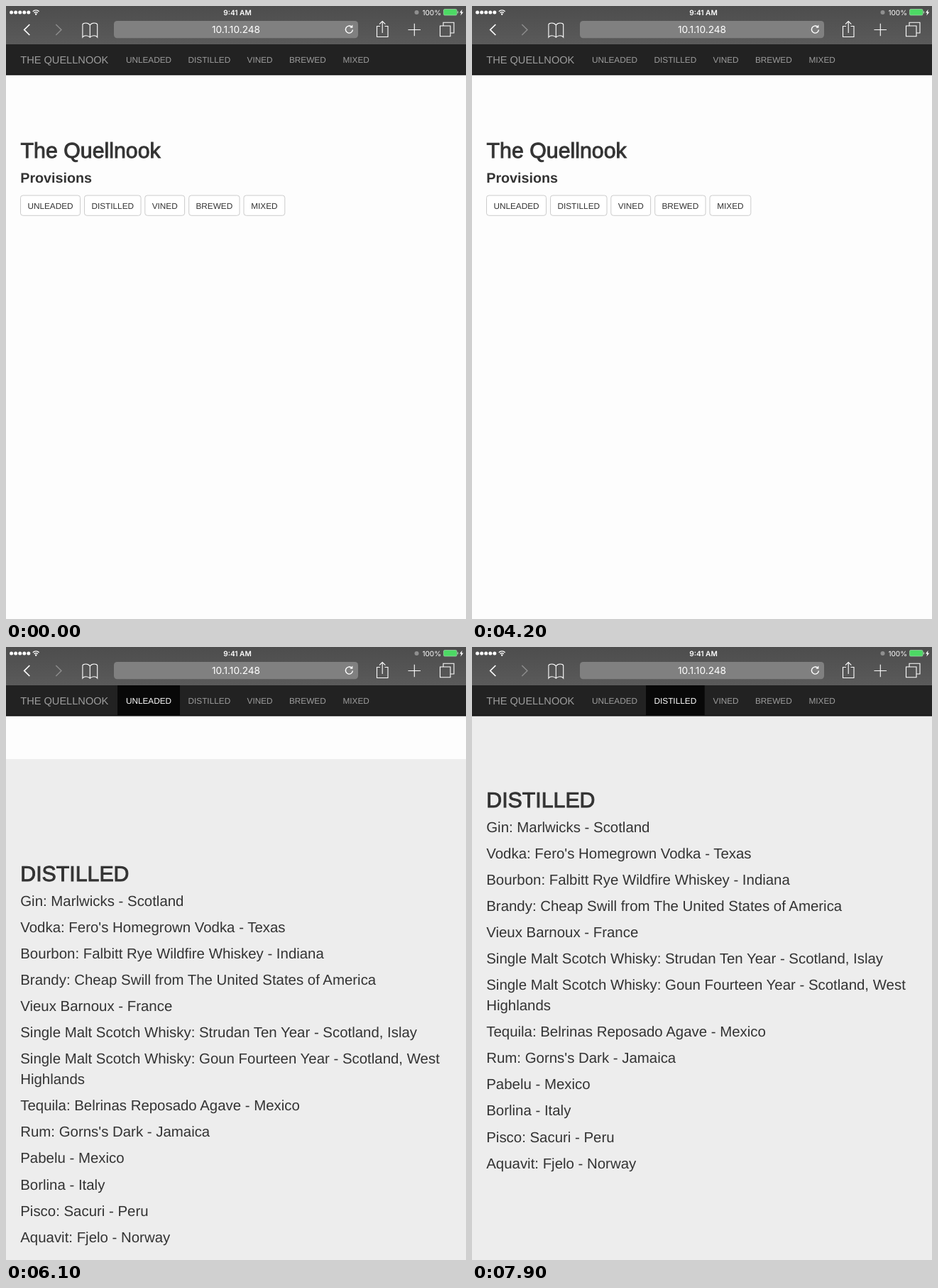
Write an HTML page that moves like this. It is 648 by 864 pixels and loops after 8000 ms.

```html
<!DOCTYPE html>
<html lang="en">
<head>
<meta charset="utf-8">
<title>Provisions</title>
<style>
  html, body { margin: 0; width: 100%; height: 100%; overflow: hidden; background: #fdfdfd; }
  svg { display: block; width: 648px; height: 864px; font-family: "Liberation Sans", Arial, sans-serif; text-rendering: geometricPrecision; }
  .page { fill: #333; }
  .title { font-size: 30.3px; stroke: #333; stroke-width: .95px; }
  .subtitle { font-size: 19.7px; font-weight: 700; }
  .item { font-size: 20.42px; }
  .small { font-size: 11.81px; text-anchor: middle; }
  .btn { fill: #fff; stroke: #ccc; }
  .nav { fill: #9d9d9d; }
  .brand { font-size: 14.6px; }
  .active { fill: #fff; }
  .ui { font-family: Inter, Roboto, sans-serif; fill: #fff; }
  .icon { fill: none; stroke: #fff; stroke-width: 1.1; }
</style>
</head>
<body>
<svg viewBox="0 0 648 864">
  <defs>
    <linearGradient id="bar" x2="0" y2="1">
      <stop stop-color="#4d4d4d"/>
      <stop offset="1" stop-color="#5a5a5a"/>
    </linearGradient>
  </defs>
  <rect width="648" height="864" fill="#fdfdfd"/>
  <g class="page" id="page">
    <text class="title" x="20.6" y="160">The Quellnook</text>
    <text class="subtitle" x="20.25" y="195">Provisions</text>
  </g>

  <g class="nav" id="nav">
    <rect y="54" width="648" height="43.3" fill="#222"/>
    <rect id="highlight" y="54" height="42.3" fill="#080808"/>
    <rect y="96.3" width="648" height="1" fill="#080808"/>
    <text class="brand" x="20.25" y="81.3">THE QUELLNOOK</text>
  </g>

  <rect width="648" height="54" fill="url(#bar)"/>
  <g class="ui" id="status">
    <text x="326" y="12.6" font-size="10.1" font-weight="600" text-anchor="middle">9:41 AM</text>
    <text x="613" y="12.6" font-size="10" text-anchor="end">100%</text>
    <g class="icon">
      <path d="M37.8 7.7a6.2 6.2 0 0 1 8.8 0M39.6 9.7a3.7 3.7 0 0 1 5.2 0" stroke-width="1.4"/>
      <circle cx="42.2" cy="11.6" r=".7" fill="#fff"/>
    </g>
    <circle cx="578.5" cy="9" r="3" fill="#8f8f8f"/>
    <rect x="616.5" y="4.5" width="18.5" height="8.5" rx="1.5" fill="#4cd964" stroke="#a5d9ae" stroke-width=".7"/>
    <rect x="635.8" y="7.2" width="1.3" height="3.2" rx=".6" fill="#a5d9ae"/>
    <path d="M642.6 4.8l-3.6 4.8h2.2l-.8 3.8 3.8-5h-2.3z"/>
  </g>
  <rect x="152" y="21" width="344" height="24.2" rx="4.5" fill="#808080"/>
  <text class="ui" x="324" y="38.2" font-size="13.7" text-anchor="middle">10.1.10.248</text>
  <g class="icon">
    <path d="M33.3 26l-7.6 7.5 7.6 7.5" stroke-width="1.7"/>
    <path d="M70.3 26l7.6 7.5-7.6 7.5" stroke="#8c8c8c" stroke-width="1.5"/>
    <path d="M118.3 27q-2-3-5.8-3t-4.6 2v18q1.5-2.2 4.8-2.2t5.6 2.4q2.3-2.4 5.6-2.4t4.8 2.2v-18q-.8-2-4.6-2t-5.8 3v17"/>
    <path d="M486.7 29.3a5 5 0 1 0 1.7 4.2" stroke-width="1.4"/>
    <path d="M484.3 30.8h4v-4.3z" fill="#fff" stroke="none"/>
    <path d="M527 28.5h-4.5v15h15.500v-15h-4.500M530.2 38v-16.5M526 25.7l4.2-4.2 4.2 4.2"/>
    <path d="M566.5 33.5h17.5M575.3 24.7v17.6"/>
    <path d="M611.5 28h14.5v14.8h-14.5zM616 28v-4.8h15v14.8h-5"/>
  </g>
</svg>
<script>
const LOOP = 8000, STEP = 100, SECTION = 810, TOP = 54;
const SCROLL = { start: 5128, length: 1500, distance: 2 * SECTION };
const $ = id => document.getElementById(id);

function add(parent, tag, attrs, text) {
  const node = document.createElementNS(parent.namespaceURI, tag);
  for (const name in attrs) node.setAttribute(name, attrs[name]);
  if (text) node.textContent = text;
  return parent.appendChild(node);
}

// label, button left, button width, tab left, tab width
const tabs = [
  ["UNLEADED", 20.5, 84, 157, 88],
  ["DISTILLED", 110.5, 79.5, 245, 82.7],
  ["VINED", 195.8, 55.8, 327.7, 59.8],
  ["BREWED", 257.7, 71.3, 387.5, 74.7],
  ["MIXED", 335, 57.8, 462.2, 62]
];
const links = tabs.map(([label, bx, bw, tx, tw]) => {
  add($("page"), "rect", { class: "btn", x: bx, y: 213, width: bw, height: 28.3, rx: 3.4 });
  add($("page"), "text", { class: "small", x: bx + bw / 2, y: 231.5 }, label);
  return add($("nav"), "text", { class: "small", x: tx + tw / 2, y: 79.7 }, label);
});

function addSection(index, title, fill, lines) {
  const group = add($("page"), "g", { transform: `translate(0 ${index * SECTION})` });
  add(group, "rect", { width: 648, height: SECTION, fill });
  add(group, "text", { class: "title", x: 20.25, y: 171.5 }, title);
  let y = 206.5;
  for (const line of lines) {
    line.split("\n").forEach((part, i) => {
      if (i) y += 28.69;
      add(group, "text", { class: "item", x: 20.25, y }, part);
    });
    y += 37.125;
  }
}

addSection(1, "UNLEADED", "#fdfdfd", [
  "On Tap: Water", "Nuva-Cola", "Diet Zupki", "Club Soda", "Tonic",
  "Italian Sodas...", "Coffee: Home Roasted Beans"
]);
addSection(2, "DISTILLED", "#ededed", [
  "Gin: Marlwicks - Scotland",
  "Vodka: Fero's Homegrown Vodka - Texas",
  "Bourbon: Falbitt Rye Wildfire Whiskey - Indiana",
  "Brandy: Cheap Swill from The United States of America",
  "Vieux Barnoux - France",
  "Single Malt Scotch Whisky: Strudan Ten Year - Scotland, Islay",
  "Single Malt Scotch Whisky: Goun Fourteen Year - Scotland, West\nHighlands",
  "Tequila: Belrinas Reposado Agave - Mexico",
  "Rum: Gorns's Dark - Jamaica",
  "Pabelu - Mexico",
  "Borlina - Italy",
  "Pisco: Sacuri - Peru",
  "Aquavit: Fjelo - Norway"
]);

for (let i = 0; i < 5; i++) add($("status"), "circle", { cx: 7.6 + i * 6.05, cy: 9, r: 2.5 });

function easeInOutExpo(p) {
  if (p <= 0) return 0;
  if (p >= 1) return 1;
  return p < .5 ? 2 ** (20 * p - 10) / 2 : 1 - 2 ** (10 - 20 * p) / 2;
}

function render(time) {
  const scroll = SCROLL.distance * easeInOutExpo((time - SCROLL.start) / SCROLL.length);
  $("page").setAttribute("transform", `translate(0 ${(TOP - scroll).toFixed(2)})`);

  const active = time < 6000 ? -1 : time < 6400 ? 0 : 1;
  links.forEach((link, i) => link.classList.toggle("active", i === active));
  const [, , , x, width] = tabs[active] || [0, 0, 0, 0, 0];
  $("highlight").setAttribute("x", x);
  $("highlight").setAttribute("width", width);
}

const began = performance.now();
function tick() {
  const time = (performance.now() - began) % LOOP;
  render(Math.floor(time / STEP) * STEP);
  requestAnimationFrame(tick);
}
tick();
</script>
</body>
</html>
```
